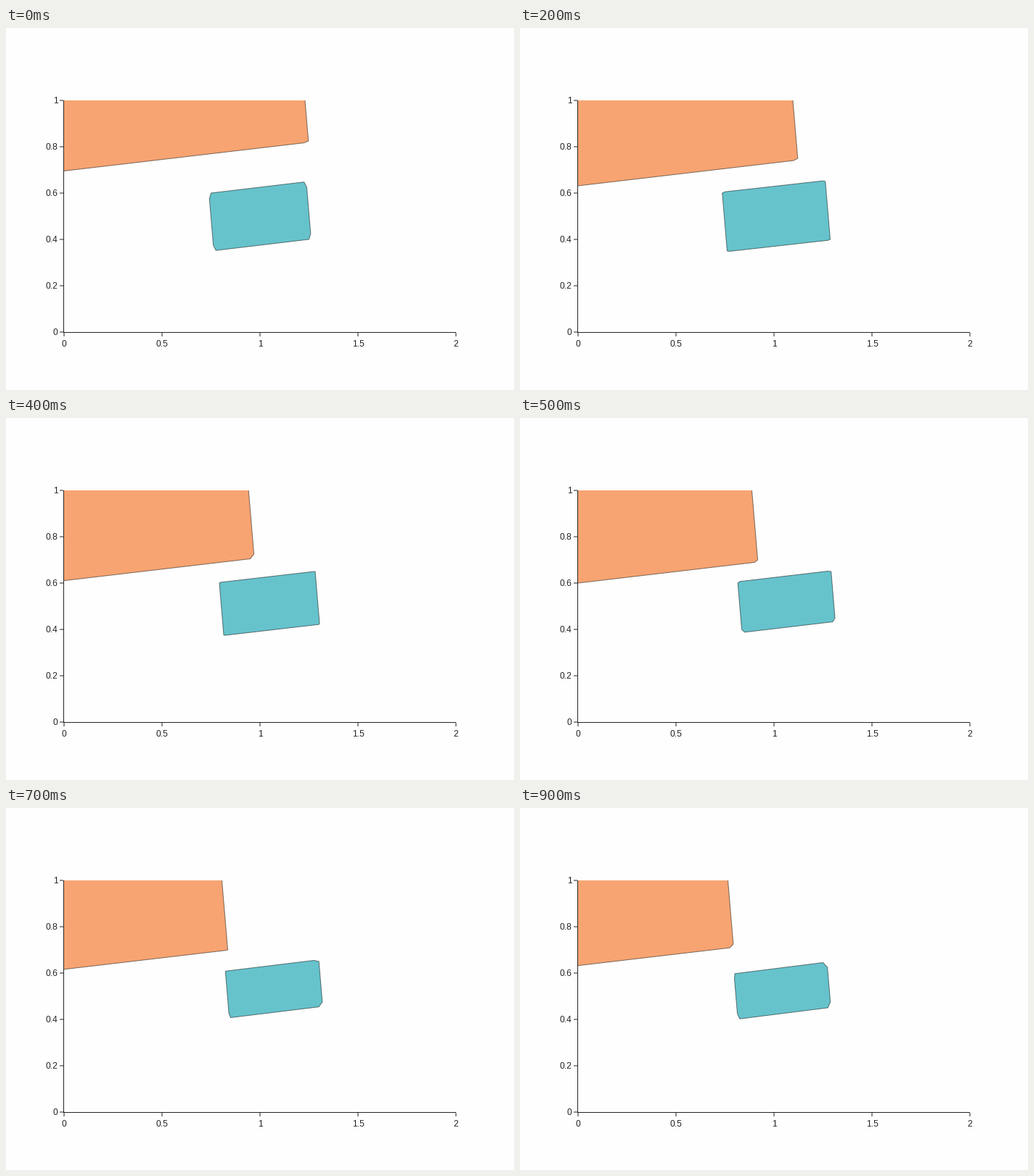
Write a matplotlib script that moves like this. It is 700 px wide and 500 px high and loops after 1 s.

```python
import math

import numpy as np
import matplotlib.pyplot as plt
from matplotlib.animation import FuncAnimation
from matplotlib.patches import Polygon, Rectangle

W, H, DPI = 700, 500, 100
PX = 72 / DPI
INK = "#242424"
FRAMES, INTERVAL = 10, 100

LEFT, TOP = 80, 100
CELL = 540 / 80, 320 / 40  # sampling grid of the contours
LEAN = 0.084               # tilt of the steep sides
EM = 12                    # label size in pixels


def track(frame, **keys):
    """Piecewise linear motion through key poses named t0, t1, ..."""
    return np.interp(frame, [int(k[1:]) for k in keys], list(keys.values()))


def corner(level, steep, slope, ref, is_left, is_top):
    """Ends of the chamfer where both sides last cross the grid."""
    x0, y0 = ref
    tip_x = (steep + LEAN * (level + slope * x0 - y0)) / (1 + LEAN * slope)
    tip_y = level - slope * (tip_x - x0)
    snap_x = math.ceil if is_left else math.floor
    snap_y = math.ceil if is_top else math.floor
    cut_x = LEFT + CELL[0] * snap_x((tip_x - LEFT) / CELL[0])
    cut_y = TOP + CELL[1] * snap_y((tip_y - TOP) / CELL[1])
    return [(cut_x, level - slope * (cut_x - x0)),
            (steep + LEAN * (cut_y - y0), cut_y)]


def teal_points(frame):
    left = track(frame, t0=282.3, t1=264.2, t2=281.4, t3=290.5, t6=309, t9=297.5)
    right = track(frame, t0=417.8, t1=409.4, t2=424.8, t5=432.7, t6=439.3, t9=427)
    top = track(frame, t0=219.9, t1=216.3, t3=221, t7=219.5, t9=222)
    bottom = track(frame, t0=300, t2=301.6, t5=291.1, t7=284.6, t9=285.3)
    slope = track(frame, t0=0.119, t2=0.112, t9=0.126)
    ref = 350, 260
    return np.array(corner(top, left, slope, ref, True, True)[::-1]
                    + corner(top, right, slope, ref, False, True)
                    + corner(bottom, right, slope, ref, False, False)[::-1]
                    + corner(bottom, left, slope, ref, True, False))


def orange_edge(frame):
    low = track(frame, t0=197.5, t2=218, t5=228, t9=217.7)
    right = track(frame, t0=412, t2=376, t3=349, t5=319.5, t7=297.5, t9=286.5)
    bend = corner(low, right, 0.1175, (LEFT, TOP), False, False)
    return np.array([(LEFT, low), *bend, (right, TOP)])


fig = plt.figure(figsize=(W / DPI, H / DPI), dpi=DPI, facecolor="#fefefe")
ax = fig.add_axes([0, 0, 1, 1])
ax.set(xlim=(0, W), ylim=(H, 0))
ax.axis("off")

orange = ax.add_patch(Polygon([(LEFT, TOP)] * 3, fc="#f7a472", lw=0))
teal = ax.add_patch(Polygon([(LEFT, TOP)] * 3, fc="#66c3cc", lw=0))
stroke = dict(color="black", alpha=0.5, lw=PX, solid_capstyle="butt")
orange_line, = ax.plot([], [], **stroke)
teal_line, = ax.plot([], [], **stroke)


def bar(x, y, w, h):
    ax.add_patch(Rectangle((x, y), w, h, fc=INK, lw=0, snap=False, zorder=5))


def label(x, y, value, anchor):
    """Place a number by its advance width; anchor 0.5 centres, 1 ends at x."""
    text = f"{value:g}"
    advance = EM * sum(0.278 if c == "." else 0.556 for c in text)
    ax.text(x - anchor * advance, y, text, va="baseline", color=INK,
            family="Liberation Sans", size=EM * PX)


bar(79, 100, 1, 321)
bar(79, 420, 541, 1)
for i in range(6):
    y = 420 - 64 * i
    bar(74, y - 0.5, 5, 1)
    label(71.6, y + 4.2, i / 5, 1)
for i in range(5):
    x = LEFT + 135 * i
    bar(x - 0.5, 421, 1, 5)
    label(x, 440.4, i / 2, 0.5)


def draw(frame):
    edge = orange_edge(frame)
    orange.set_xy(np.vstack([edge, [(LEFT, TOP)]]))
    orange_line.set_data(*edge.T)

    points = teal_points(frame)
    teal.set_xy(points)
    teal_line.set_data(*np.vstack([points, points[:1]]).T)
    return orange, orange_line, teal, teal_line


anim = FuncAnimation(fig, draw, frames=FRAMES, interval=INTERVAL,
                     repeat=True, repeat_delay=0)
plt.show()
```
